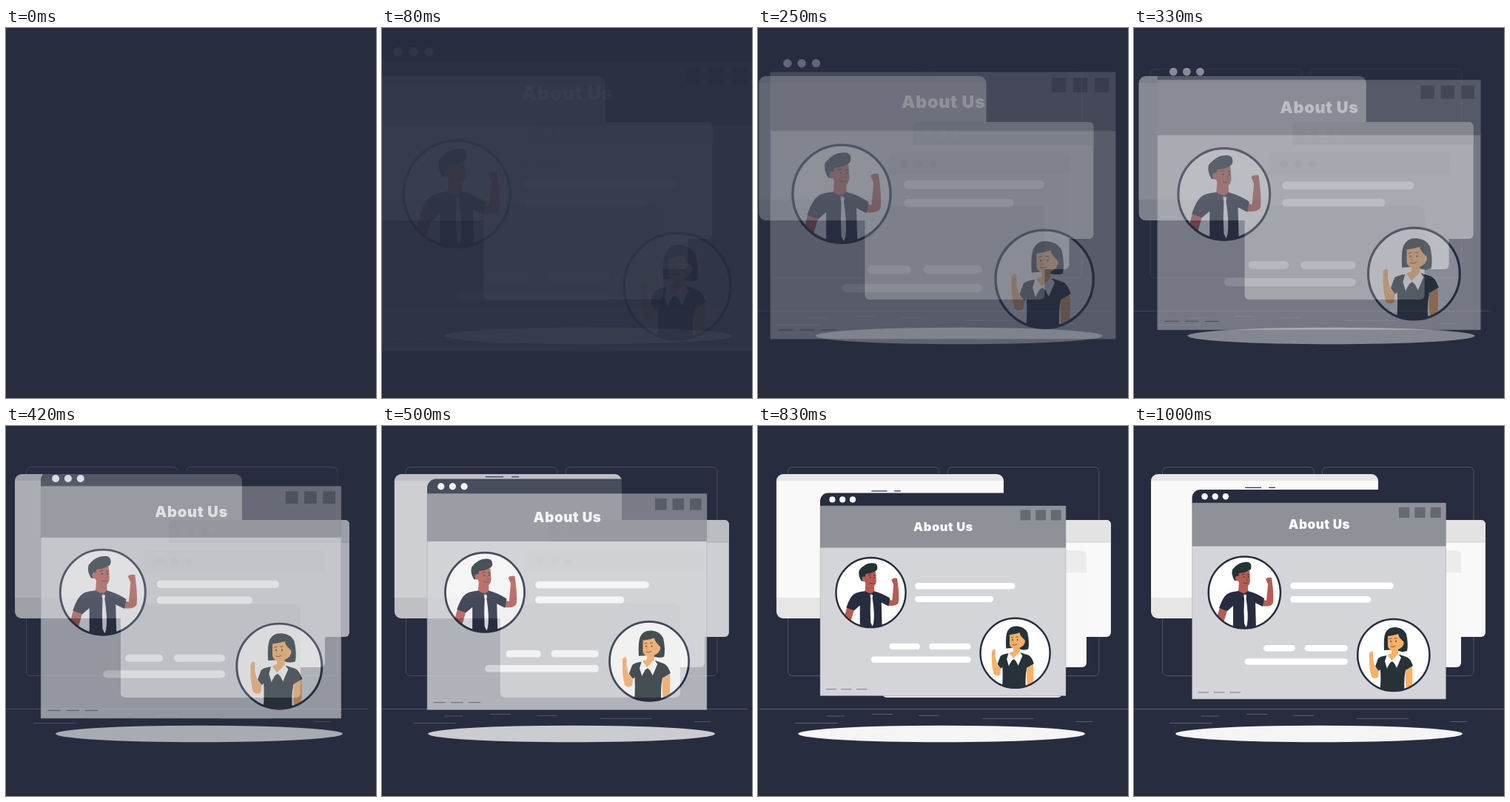
An HTML page with a canvas for the animation above (1040 ms loop, 500 px wide and 500 px high).

```html
<!DOCTYPE html>
<html lang="en">
<head>
<meta charset="utf-8">
<title>About Us</title>
<style>
html, body { margin: 0; width: 100%; height: 100%; overflow: hidden; background: #272c3f; }
canvas { display: block; width: 500px; height: 500px; }
</style>
</head>
<body>
<canvas id="stage" width="500" height="500"></canvas>
<script>
const SIZE = 500, LOOP = 1040, FPS = 24;
const NAVY = '#272c3f', INK = '#263238', GREY = '#8f9199', PALE = '#d4d5d9', SOFT = '#f9f9f9', TRIM = '#e6e6e6';
const BROWN = '#b85c51', PEACH = '#fbb067';

const out = document.getElementById('stage').getContext('2d');
const layer = document.createElement('canvas');
layer.width = layer.height = SIZE;
const c = layer.getContext('2d');

// Cubic bezier easing (.36, -.01, .5, 1.38)
function ease(x) {
  if (x <= 0) return 0;
  if (x >= 1) return 1;
  const curve = (s, a, b) => 3 * (1 - s) * (1 - s) * s * a + 3 * (1 - s) * s * s * b + s * s * s;
  let lo = 0, hi = 1;
  for (let i = 0; i < 30; i++) {
    const mid = (lo + hi) / 2;
    if (curve(mid, 0.36, 0.5) < x) lo = mid; else hi = mid;
  }
  return curve(lo, -0.01, 1.38);
}

function box(x0, y0, x1, y1, fill, r = 0) {
  c.fillStyle = fill;
  c.beginPath();
  c.roundRect(x0, y0, x1 - x0, y1 - y0, r);
  c.fill();
}

function frame(x0, y0, x1, y1, color, width, r = 0) {
  c.strokeStyle = color;
  c.lineWidth = width;
  c.beginPath();
  c.roundRect(x0, y0, x1 - x0, y1 - y0, r);
  c.stroke();
}

function dash(x0, x1, y, color, width = 1) {
  c.strokeStyle = color;
  c.lineWidth = width;
  c.beginPath();
  c.moveTo(x0, y);
  c.lineTo(x1, y);
  c.stroke();
}

function oval(x, y, rx, ry, fill, turn = 0) {
  c.fillStyle = fill;
  c.beginPath();
  c.ellipse(x, y, rx, ry, turn, 0, 7);
  c.fill();
}

function shape(d, fill) {
  c.fillStyle = fill;
  c.fill(new Path2D(d));
}

function line(d, color, width) {
  c.strokeStyle = color;
  c.lineWidth = width;
  c.lineCap = c.lineJoin = 'round';
  c.stroke(new Path2D(d));
  c.lineCap = 'butt';
}

function dots(x, y, gap, r, fill) {
  for (let i = 0; i < 3; i++) oval(x + i * gap, y, r, r, fill);
}

function backdrop() {
  const thin = '#5d606e';
  frame(38.5, 55.5, 243, 337.5, thin, 0.8, 6);
  frame(254.5, 55.5, 459, 337.5, thin, 0.8, 6);
  dash(0, 500, 382.5, thin);
  dash(48, 106, 401.5, thin);
  dash(90.5, 115, 392, thin);
  dash(152, 180, 389.5, thin);
  dash(215, 243, 391.3, thin);
  dash(301, 371, 395.3, thin);
  dash(428, 450, 399.5, thin);

  box(23, 65, 330, 260, TRIM, 9);
  box(23, 74, 330, 232, SOFT);

  box(231, 127, 475, 285, SOFT, 6);
  box(231, 127, 475, 157, '#e3e3e3', [6, 6, 0, 0]);
  dash(231, 475, 157, '#c8c8c8', 0.8);
  dots(251, 142, 19.5, 5.5, '#ededed');

  box(198, 168, 442, 326, '#f8f8f8', 6);
  box(198, 168, 442, 198, '#ececec', [6, 6, 0, 0]);
  dots(219, 183.5, 19.5, 5.2, '#dedede');

  box(166, 240, 409, 367, '#e1e1e1', 6);
}

function shadow() {
  oval(250, 416, 194, 11.3, '#f5f5f5');
}

function portrait(x, y, person) {
  oval(x, y, 49, 49, '#fff');
  c.save();
  c.beginPath();
  c.arc(x, y, 48.5, 0, 7);
  c.clip();
  person();
  c.restore();
  c.strokeStyle = NAVY;
  c.lineWidth = 2.5;
  c.beginPath();
  c.arc(x, y, 48.6, 0, 7);
  c.stroke();
}

function man() {
  shape('M116 245L126 249L121 266L111 266Q113 254 116 245Z', BROWN);
  shape('M171 234L179 236L181 214L178 207Q180 204 186 205L187 213Q189 228 188 239Q185 245 173 243Z', BROWN);
  shape('M141 223Q130 224 126 227Q120 231 115 246L126 250L134 243L134 276L165 276L164 239L174 244L176 233Q166 226 154 223Z', NAVY);
  shape('M142 211L154 214L154 223Q150 229 141 223Z', BROWN);
  shape('M139 197Q147 192 156 196L157 209Q156 218 149 217Q141 215 140 206Z', BROWN);
  shape('M136 209Q131 201 133 194Q141 184 150 184Q156 183 158 187Q160 194 154 196Q148 199 142 199L140 209Z', INK);
  oval(139.5, 206, 2.5, 3.5, BROWN);
  shape('M148 228L150 227L152 229L151.5 233Q155 255 153 268L151.5 272L149 267Q148 250 149 233Z', '#fff');
  line('M141 223L149 229L154 223', INK, 0.6);
  line('M146 201L149 200M153 201L156 201', INK, 0.8);
  line('M152 205L154 209L152 209.5', '#8b3e3a', 0.6);
  line('M148 212Q151 213.5 154 212', INK, 0.7);
  oval(148.5, 204, 0.8, 1, INK);
  oval(154.5, 204, 0.8, 1, INK);
  line('M181 209L185 209', '#8b3e3a', 0.5);
}

function woman() {
  shape('M368 326L376 325Q377 342 375 361L369 361Q365 342 368 326Z', PEACH);
  shape('M318 307Q320 303 323 305L323 315L326 327L331 327L330 339Q326 343 321 339Q318 329 318 317Z', PEACH);
  shape('M342 310Q333 311 330 314L326 325L331 331L333 329Q334 347 332 361L366 361Q364 344 367 330L377 324Q373 313 368 312L359 309Z', INK);
  shape('M338 303Q337 285 340 279Q344 271 354 272Q364 273 368 281Q371 295 369 304Q361 307 353 302Z', INK);
  shape('M348 298L357 298L357 309L349 321L343 309L348 307Z', PEACH);
  shape('M343 284Q351 283 357 281Q358 286 362 289L363 298Q357 304 349 303Q342 302 343 294Z', PEACH);
  oval(362, 293.5, 2.5, 3.5, PEACH);
  shape('M342 308L339 318L342 328L348 319L355 327L361 313L357 308L348 317Z', '#fff');
  shape('M346 320L349 318L352 321L355 327L348 330L342 327Z', INK);
  line('M345 288L348 287M352 287L355 287', INK, 0.7);
  oval(347, 291, 0.8, 1, INK);
  oval(354, 291, 0.8, 1, INK);
  line('M349 291L347.5 295L349.5 295', '#d3803f', 0.6);
  line('M347 298Q350 299.5 353 297.5', INK, 0.7);
  line('M319 311L322 310', '#d3803f', 0.5);
}

function panel() {
  dash(150, 172, 83.3, NAVY, 1.2);
  dash(182, 191, 83.3, NAVY, 1.2);
  box(78.5, 86, 421.5, 106, NAVY, [11, 11, 0, 0]);
  dots(95.5, 95.2, 14.2, 4.2, '#fff');
  box(78.5, 162, 421.5, 369, PALE);
  box(78.5, 104, 421.5, 162.5, GREY);
  frame(78.6, 104, 421.4, 369, GREY, 0.4);
  for (let i = 0; i < 3; i++) box(358 + i * 21.3, 109.8, 372.2 + i * 21.3, 124, '#656974');

  c.fillStyle = '#fff';
  c.font = '900 17px Inter, "DejaVu Sans", sans-serif';
  c.letterSpacing = '0.6px';
  c.textAlign = 'center';
  c.fillText('About Us', 250.5, 139.3);

  box(211, 211.6, 350.7, 220.2, '#fff', 4.3);
  box(211, 230, 320.3, 238.4, '#fff', 4.3);
  box(175, 296, 218, 304.6, '#fff', 4.3);
  box(230.5, 296, 289, 304.6, '#fff', 4.3);
  box(149.5, 314.2, 289, 322.8, '#fff', 4.3);
  for (let i = 0; i < 3; i++) dash(86.3 + i * 21.4, 101 + i * 21.4, 360, '#80838d', 1.1);

  portrait(149.3, 225, man);
  portrait(350.8, 309.5, woman);
}

function place(draw, alpha, dx, scale = 1) {
  c.setTransform(1, 0, 0, 1, 0, 0);
  c.clearRect(0, 0, SIZE, SIZE);
  c.setTransform(scale, 0, 0, scale, 250 * (1 - scale) + dx, 227 * (1 - scale));
  draw();
  out.globalAlpha = alpha;
  out.drawImage(layer, 0, 0);
  out.globalAlpha = 1;
}

// Motion advances in steps of 1/24 s, rounded to 10 ms
function stepAt(ms) {
  let k = FPS;
  while (k > 0 && Math.round(k * 100 / FPS) * 10 > ms) k--;
  return k;
}

function render(ms) {
  const k = stepAt(ms);
  out.fillStyle = NAVY;
  out.fillRect(0, 0, SIZE, SIZE);
  if (k < 2) return;
  const p = ease(k / FPS + 0.028);
  const alpha = Math.max(0, Math.min(1, p));
  place(backdrop, alpha, -30 * (1 - p));
  place(shadow, alpha, 30 * (1 - p));
  place(panel, alpha, 0, 1.5 - 0.5 * p);
}

const start = performance.now();
function tick() {
  render((performance.now() - start) % LOOP);
  requestAnimationFrame(tick);
}
tick();
</script>
</body>
</html>
```
